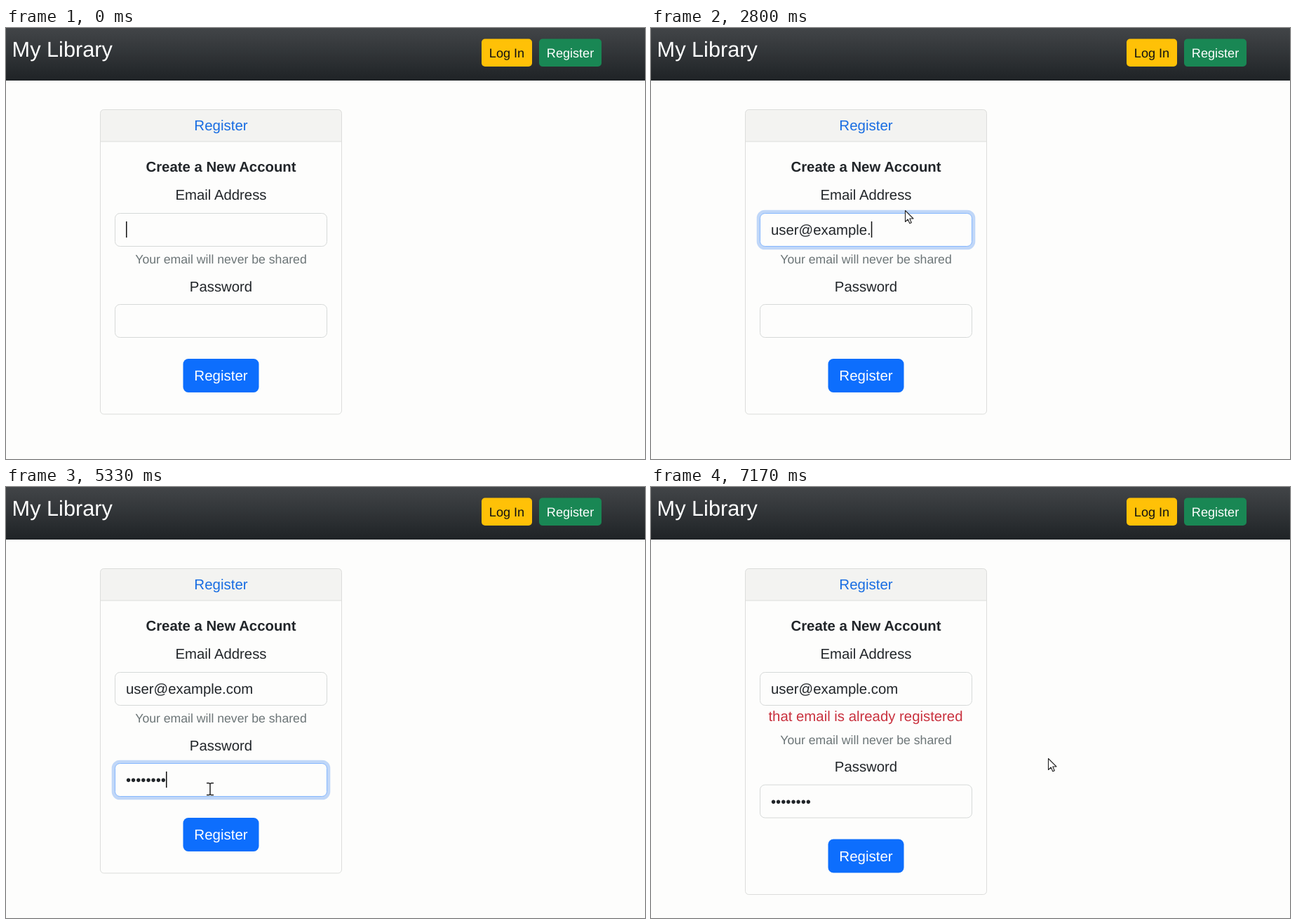
An HTML page for the animation above (7210 ms loop, 911x615 px).

```html
<!DOCTYPE html>
<html lang="en">
<head>
<meta charset="utf-8">
<title>My Library</title>
<style>
  html, body { margin: 0; width: 100%; height: 100%; overflow: hidden; background: #fdfdfc; }
  svg { display: block; width: 911px; height: 615px; }
  text { font: 20.35px "Liberation Sans", Arial, sans-serif; fill: #212529; text-rendering: geometricPrecision; white-space: pre; }
  .mid { text-anchor: middle; }
  .nav { font-size: 18.1px; }
  .label { font-size: 20.5px; }
  .hint { font-size: 17.65px; fill: #6c7577; }
  .field { fill: #fdfdfc; stroke: #d6d9d8; }
  .ring { fill: #fdfdfc; stroke: #c0d7f8; stroke-width: 5; }
  .glow { fill: none; stroke: #86b7fe; }
  .pointer { fill: #fff; stroke: #222; stroke-width: 1.1; stroke-linejoin: round; }
</style>
</head>
<body>
<svg viewBox="0 0 911 615">
  <defs>
    <linearGradient id="bar" x2="0" y2="1">
      <stop stop-color="#424548"/>
      <stop offset="1" stop-color="#1f2326"/>
    </linearGradient>
  </defs>

  <rect width="911" height="75" fill="url(#bar)"/>
  <text x="8.6" y="41" style="font-size:30.7px;fill:#fff">My Library</text>
  <rect x="678" y="15.5" width="72" height="39.5" rx="5" fill="#ffc107"/>
  <text class="mid nav" x="714" y="42" style="fill:#111">Log In</text>
  <rect x="760" y="15.5" width="89" height="39.5" rx="5" fill="#198754"/>
  <text class="mid nav" x="804.5" y="42" style="fill:#fff">Register</text>

  <path d="M134.500 162V121.500a5 5 0 0 1 5-5H473.500a5 5 0 0 1 5 5V162Z" fill="#f3f3f1"/>
  <path d="M134.500 162H478.500" stroke="#dcdddb"/>
  <rect id="card" x="134.500" y="116.500" width="344" height="434.500" rx="5" fill="none" stroke="#dcdddb"/>
  <text class="mid label" x="306.500" y="146" style="fill:#186de2">Register</text>
  <text class="mid" x="306.500" y="205" font-weight="bold" style="font-weight:bold">Create a New Account</text>
  <text class="mid" x="306.500" y="245">Email Address</text>

  <g id="email">
    <rect class="field" x="155.500" y="264.500" width="302" height="47" rx="7"/>
    <g class="focus">
      <rect class="ring" x="153.200" y="262.200" width="306.600" height="51.600" rx="9"/>
      <rect class="glow" x="155.500" y="264.500" width="302" height="47" rx="7"/>
    </g>
    <text class="value" x="171" y="295"></text>
  </g>

  <text id="error" class="mid" x="306" y="334" style="fill:#c9313e">that email is already registered</text>

  <g id="lower">
    <text class="mid hint" x="306.500" y="336">Your email will never be shared</text>
    <text class="mid" x="306.500" y="375.500">Password</text>
    <g id="password">
      <rect class="field" x="155.500" y="394.500" width="302" height="47" rx="7"/>
      <g class="focus">
        <rect class="ring" x="153.200" y="392.200" width="306.600" height="51.600" rx="9"/>
        <rect class="glow" x="155.500" y="394.500" width="302" height="47" rx="7"/>
      </g>
      <text class="value" x="171" y="425"></text>
    </g>
    <rect id="buttonRing" x="250" y="469.500" width="113" height="53" rx="10" fill="none" stroke="#98c1fe" stroke-width="5"/>
    <rect id="button" x="252.500" y="472" width="108" height="48" rx="7.500"/>
    <text class="mid label" x="306.500" y="503" style="fill:#fff">Register</text>
  </g>

  <rect id="caret" width="1.500" height="23" fill="#111"/>

  <g id="mouse">
    <path id="arrow" class="pointer" d="M.500.500V16.500L4.200 13L6.800 18.800L9.300 17.700L6.800 12H12Z"/>
    <path id="beam" d="M-5-8.500H-1.500L0-7.500L1.500-8.500H5M0-7.500V7.500M-5 8.500H-1.500L0 7.500L1.500 8.500H5" fill="none" stroke="#222" stroke-width="1.500"/>
    <path id="hand" class="pointer" d="M-2 1Q0-2 2 1V8Q4 6.500 5.200 8.500Q7 7.500 8 9.300Q10 9 10 11.500V15Q9.500 18 8 20V22H-1V20Q-4 17-6 13.500Q-7 11-5 11Q-3.500 11.500-2 13.500Z"/>
  </g>
</svg>

<script>
const LOOP = 7210, TAB = 3400, CLICK = 5600, REPLY = 5730, SHIFT = 30.5;
const ADDRESS = "user@example.com";
// Moment at which each character appears
const addressKeys = [770, 930, 970, 1000, 1440, 1670, 1870, 2000, 2130, 2300, 2400, 2470, 2800, 3000, 3170, 3200];
const passwordKeys = [3900, 4070, 4270, 4300, 4570, 4630, 4830, 5000];
// Pointer stops: time, x, y
const stops = [
  [30, 310, 292], [700, 359, 261], [1200, 359, 261], [1370, 362, 260], [5030, 362, 260],
  [5330, 291, 431], [5560, 296, 501], [6030, 296, 501], [6430, 566, 387]
];

const $ = s => document.querySelector(s);
const fade = (t, start, span = 150) => Math.min(1, Math.max(0, (t - start) / span));
const typed = (t, keys) => keys.filter(k => k <= t).length;
const show = (s, on) => $(s).setAttribute("visibility", on ? "visible" : "hidden");

function pointerAt(t) {
  const i = stops.findIndex(s => s[0] > t);
  if (i < 0) return stops[stops.length - 1].slice(1);
  if (i === 0) return stops[0].slice(1);
  const [t0, x0, y0] = stops[i - 1], [t1, x1, y1] = stops[i];
  const u = (t - t0) / (t1 - t0), e = u * u * (3 - 2 * u);
  return [x0 + (x1 - x0) * e, y0 + (y1 - y0) * e];
}

function drawMouse(t, shift) {
  const [x, y] = pointerAt(t);
  const inside = (left, right, top, bottom) => x > left && x < right && y > top && y < bottom;
  const hand = inside(252, 361, 470 + shift, 520 + shift);
  const beam = inside(155, 458, 264, 312) || inside(155, 458, 394 + shift, 442 + shift);
  $("#mouse").setAttribute("transform", `translate(${x} ${y})`);
  const on = t >= 30;
  show("#hand", on && hand);
  show("#beam", on && beam);
  show("#arrow", on && !hand && !beam);
}

function drawCaret(t) {
  const inEmail = t < TAB;
  const value = $(inEmail ? "#email .value" : "#password .value");
  const width = value.textContent ? value.getComputedTextLength() : 0;
  $("#caret").setAttribute("x", 171 + width);
  $("#caret").setAttribute("y", inEmail ? 276 : 406);
  show("#caret", t < 5530);
}

function draw(t) {
  const failed = t >= REPLY, shift = failed ? SHIFT : 0;
  $("#email .value").textContent = ADDRESS.slice(0, typed(t, addressKeys));
  $("#password .value").textContent = "•".repeat(typed(t, passwordKeys));
  $("#email .focus").setAttribute("opacity", fade(t, 20) - fade(t, TAB, 190));
  $("#password .focus").setAttribute("opacity", failed ? 0 : fade(t, TAB, 190) - fade(t, CLICK));
  $("#buttonRing").setAttribute("opacity", failed ? 0 : fade(t, CLICK));

  const hover = fade(t, 5450) - fade(t, 6060);
  const mix = (a, b) => a + (b - a) * hover;
  $("#button").setAttribute("fill", `rgb(${mix(13, 10)},${mix(110, 92)},${mix(253, 213)})`);

  $("#lower").setAttribute("transform", `translate(0 ${shift})`);
  $("#card").setAttribute("height", 434.5 + shift);
  show("#error", failed);
  drawCaret(t);
  drawMouse(t, shift);
}

const begin = performance.now();
function tick() {
  draw((performance.now() - begin) % LOOP);
  requestAnimationFrame(tick);
}
tick();
</script>
</body>
</html>
```
